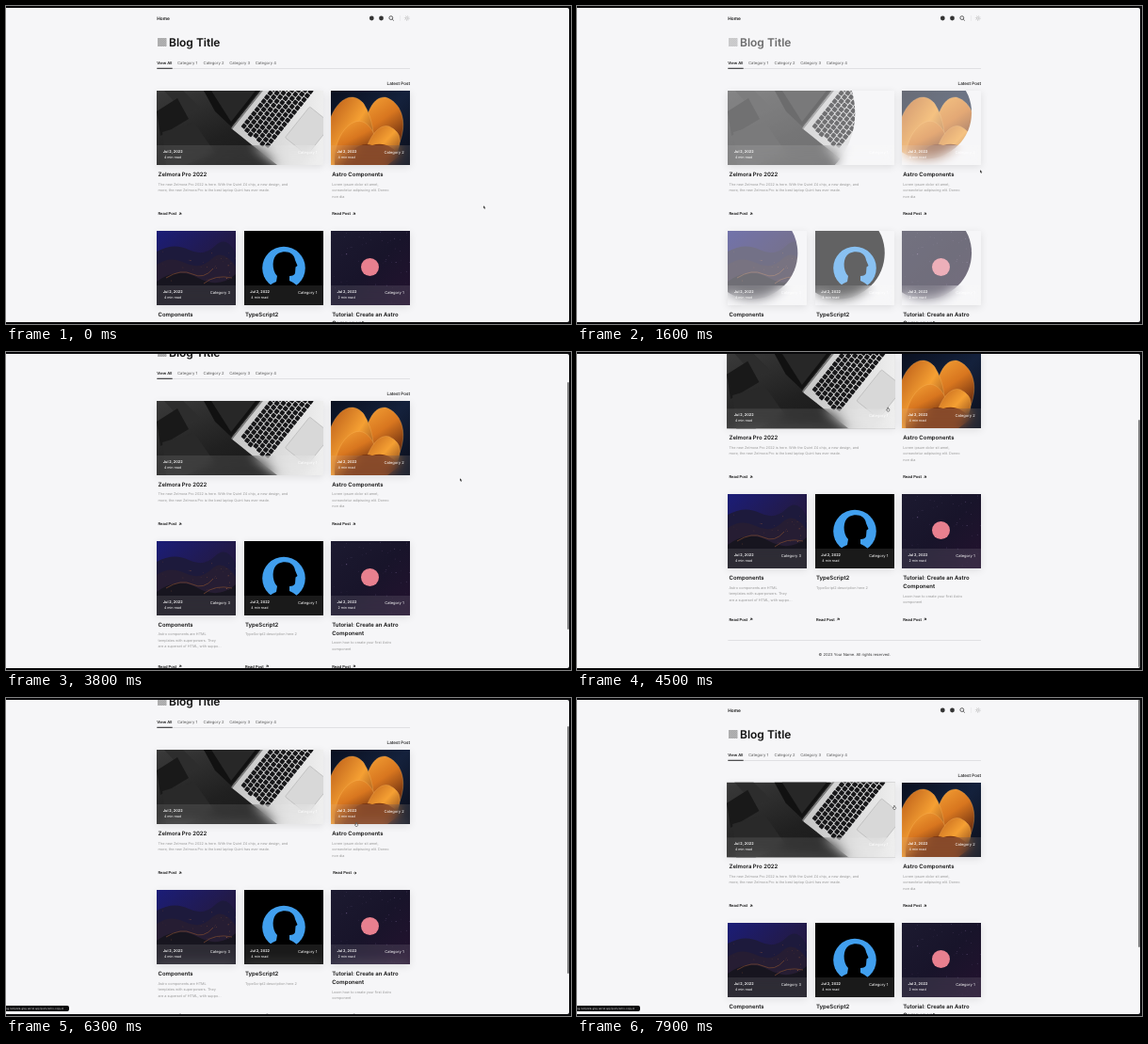
An HTML page for the animation above (8000 ms loop, 600 by 338 pixels).

```html
<!DOCTYPE html>
<html lang="en">
<head>
<meta charset="utf-8">
<title>Blog Title</title>
<style>
html, body { margin: 0; width: 100%; height: 100%; overflow: hidden; background: #000; }
#stage { position: relative; width: 600px; height: 338px; overflow: hidden; background: #08080a; }
#view { position: absolute; left: 0; top: 2px; width: 598px; height: 334px; overflow: hidden; background: #f6f6f8; border-radius: 0 2px 2px 0; }
#page { position: absolute; left: 0; top: -2px; width: 600px; height: 424px; }
svg { position: absolute; left: 0; top: 0; overflow: visible; }
text { font-family: Inter, "Open Sans", sans-serif; text-rendering: geometricPrecision; white-space: pre; }
.card { position: absolute; height: 78.5px; box-shadow: 0 2px 8px rgba(0,0,0,.1); }
.pic { position: absolute; inset: 0; overflow: hidden; }
.bar { position: absolute; left: 0; right: 0; bottom: 0; height: 20.5px; background: rgba(255,255,255,.1); backdrop-filter: blur(6px); }
#thumb { position: absolute; left: 596px; width: 1.6px; height: 263px; border-radius: 1px; background: #777; }
#status { position: absolute; left: 0; top: 327px; width: 67px; height: 6px; border-radius: 0 2px 2px 0; background: #08080a; }
</style>
</head>
<body>
<div id="stage">
  <div id="view"><div id="page"></div></div>
  <div id="thumb"></div>
  <div id="status"></div>
  <svg id="pointer" width="600" height="338">
    <path id="arrow" d="M0 0V3.4L.9 2.7 1.5 4 2.1 3.7 1.5 2.5H2.5Z" fill="#111" stroke="#fff" stroke-width=".3"/>
    <path id="hand" d="M-.4 -1.6Q0 -2.2 .4 -1.6V-.3L1.5 0Q2 1.6 1 2.4H-.6L-1.6 .6 -.4 .5Z" fill="#fff" stroke="#222" stroke-width=".5"/>
  </svg>
</div>
<script>
const $ = id => document.getElementById(id);
const INK = '#111', GREY = '#999';

const text = (x, y, s, size, weight = 400, fill = INK, anchor = 'start') =>
  `<text x="${x}" y="${y}" font-size="${size}" font-weight="${weight}" fill="${fill}" text-anchor="${anchor}">${s}</text>`;
const rect = (x, y, w, h, fill, more = '') =>
  `<rect x="${x}" y="${y}" width="${w}" height="${h}" fill="${fill}" ${more}/>`;
const path = (d, fill, more = '') => `<path d="${d}" fill="${fill}" ${more}/>`;
const gradient = (id, x2, y2, ...colors) =>
  `<linearGradient id="${id}" x1="0" y1="0" x2="${x2}" y2="${y2}">` +
  colors.map((c, i) => `<stop offset="${i / (colors.length - 1)}" stop-color="${c}"/>`).join('') + '</linearGradient>';

let seed = 7;
const random = () => (seed = seed * 16807 % 2147483647) / 2147483647;
const dots = (n, w, y0, h, fill) => Array.from({ length: n }, () =>
  `<circle cx="${random() * w}" cy="${y0 + random() * h}" r="${.2 + random() * .35}" fill="${fill}" opacity="${.3 + random() * .6}"/>`).join('');

function laptop() {
  let keys = '';
  for (let row = 0; row < 7; row++)
    for (let col = 0; col < 17; col++)
      keys += rect(8 + col * 5.6 - row % 3 * 1.2, 7 + row * 5.4, 4.8, 4.6, '#18181a', 'rx=".8"');
  return gradient('desk', 1, 1, '#3a3a3a', '#202020', '#151515') + gradient('metal', 1, 1, '#c4c4c4', '#eee', '#cfcfcf') +
    rect(0, 0, 177, 79, 'url(#desk)') +
    path('M8 0L28 0 46 18 30 24Z', '#2d2d2d') + path('M0 22L22 8 34 30 4 48Z', '#191919') +
    path('M6 44L40 34 62 66 30 79 10 79Z', '#292929') +
    path('M50 0H109L79 38 62 22Z', '#111') + path('M58 0H105L79 33Z', '#272727') +
    `<g transform="translate(79 40) rotate(-51.5)">` +
    rect(0, 0, 160, 120, 'url(#metal)', 'rx="3"') + rect(0, 0, 160, 1.6, '#777') +
    keys + rect(28, 51, 42, 30, '#d8d8d8', 'rx="1.5" stroke="#aaa" stroke-width=".5"') + '</g>';
}

function petals() {
  const line = 'stroke="#ffc066" stroke-opacity=".55" stroke-width=".5"';
  return gradient('night', 1, 1, '#0a1020', '#14213c', '#0b0d18') +
    gradient('petal', .5, 1, '#f6a437', '#d8761f', '#5a230e') + gradient('petal2', 1, 1, '#b85a18', '#f5a033', '#6b2c10') +
    rect(0, 0, 84, 79, 'url(#night)') +
    path('M32 60C36 20 46 6 58 7C74 12 82 32 73 55L52 70Z', 'url(#petal)', line) +
    path('M0 28C8 8 24 0 35 14C45 30 47 50 44 66L20 79H0Z', 'url(#petal2)', line) +
    path('M4 79C2 48 22 26 36 34C48 42 50 56 46 79Z', 'url(#petal)', line) +
    path('M34 79C36 54 50 34 62 38C74 44 76 52 70 66Z', 'url(#petal2)', line) +
    path('M14 79C20 62 32 54 44 58C56 54 68 60 72 70L60 79Z', '#7a3612');
}

function hills() {
  return gradient('dusk', 1, 1, '#1b1d78', '#221a4a', '#2a1530') + rect(0, 0, 84, 79, 'url(#dusk)') +
    path('M0 22Q18 12 34 20T62 16 84 24V79H0Z', '#1d1a3c') +
    path('M0 36Q14 26 30 34T58 30 84 38V79H0Z', '#261d33') +
    path('M0 54Q22 38 44 50T84 46V79H0Z', '#17151f') +
    path('M10 50Q26 40 38 46T60 40M50 56Q62 46 80 50', 'none', 'stroke="#70452f" stroke-width=".8"') +
    dots(32, 84, 22, 32, '#b0663a');
}

function profile() {
  return rect(0, 0, 84, 79, '#000') + '<circle cx="42" cy="39.5" r="22.8" fill="#419fee"/>' +
    path('M22 66Q25 57 34 54L35 48C29 42 29 28 36 24C44 20 53 23 54 31L56.5 37 54.5 38.5 54 45Q53 48 48 48L48 53Q58 57 61 66Z', '#000');
}

function neon() {
  return gradient('space', 1, 1, '#1c1a30', '#18142a', '#24122f') + rect(0, 0, 84, 79, 'url(#space)') +
    dots(70, 84, 0, 79, '#6d5a86') + '<circle cx="41.5" cy="38.5" r="9.5" fill="#e8808f"/>';
}

const cards = [
  { x: 160.3, y: 90, w: 176.5, art: laptop, cat: 1, min: 4, title: ['Zelmora Pro 2022'],
    body: ['The new Zelmora Pro 2022 is here. With the Quint Z4 chip, a new design, and', 'more, the new Zelmora Pro is the best laptop Quint has ever made.'] },
  { x: 345, y: 90, w: 84, art: petals, cat: 2, min: 4, title: ['Astro Components'],
    body: ['Lorem ipsum dolor sit amet,', 'consectetur adipiscing elit. Donec', 'non dia'] },
  { x: 160.3, y: 239, w: 84, art: hills, cat: 3, min: 4, title: ['Components'],
    body: ['Astro components are HTML', 'templates with superpowers. They', 'are a superset of HTML, with suppo...'] },
  { x: 252.7, y: 239, w: 84, art: profile, cat: 1, min: 4, title: ['TypeScript2'],
    body: ['TypeScript2 description here 2'] },
  { x: 345, y: 239, w: 84, art: neon, cat: 1, min: 2, title: ['Tutorial: Create an Astro', 'Component'],
    body: ['Learn how to create your first Astro', 'component'] }
];

function cardText(c, i) {
  const { x, y, w } = c, left = x + 1.2, extra = (c.title.length - 1) * 9;
  return text(x + 6.5, y + 66.4, 'Jul 2, 2022', 3.85, 600, '#fff') +
    text(x + 7.6, y + 72.2, c.min + ' min read', 3.6, 400, '#fff') +
    text(x + w - 6.3, y + 67.2, 'Category ' + c.cat, 4.05, 400, '#fff', 'end') +
    c.title.map((s, n) => text(left, y + 91.2 + n * 8.8, s, 6, 600)).join('') +
    c.body.map((s, n) => text(left, y + 100.5 + extra + n * 6.5, s, 3.78, 400, GREY)).join('') +
    `<g id="read${i}">` + text(left, y + (i < 2 ? 132.4 : 134.6), 'Read Post', 4.1, 600) +
    `<path id="tip${i}" d="M-1.4 0H1.4M.1 -1.3L1.4 0 .1 1.3" fill="none" stroke="${INK}" stroke-width=".7"/></g>`;
}

$('page').innerHTML = cards.map(c =>
  `<div class="card" style="left:${c.x}px;top:${c.y}px;width:${c.w}px"><div class="pic"><svg width="${c.w}" height="79">${c.art()}</svg></div><div class="bar"></div></div>`).join('') +
  '<svg width="600" height="424">' +
  text(160.3, 14.9, 'Home', 4.8, 600) +
  '<circle cx="388.3" cy="13" r="2.4" fill="#333"/><circle cx="398.5" cy="13" r="2.4" fill="#333"/>' +
  '<g fill="none" stroke="#222" stroke-width=".7"><circle cx="408.8" cy="12.6" r="1.9"/><path d="M410.2 14L411.8 15.6"/></g>' +
  rect(418, 10, .5, 6, '#e2e2e4') +
  '<g fill="none" stroke="#aaa" stroke-width=".6"><circle cx="425.8" cy="13" r="1.3"/><circle cx="425.8" cy="13" r="2.5" stroke-dasharray=".7 1.263"/></g>' +
  '<pattern id="hatch" width="1.4" height="1.4" patternUnits="userSpaceOnUse" patternTransform="rotate(-45)"><rect width="1.4" height=".8" fill="#777"/></pattern>' +
  '<g id="title">' + rect(161, 34, 9.5, 9, 'url(#hatch)') + text(173, 42.6, 'Blog Title', 12, 600) + '</g>' +
  text(160.3, 61.6, 'View All', 4.1, 600) +
  [1, 2, 3, 4].map(n => text(182 + (n - 1) * 27.6, 61.6, 'Category ' + n, 4.2, 400, '#555')).join('') +
  rect(160.3, 66, 268.7, .6, '#d2d2d5') + rect(160.3, 65.8, 16.4, .9, INK) +
  text(429, 84.4, 'Latest Post', 4.6, 500, INK, 'end') +
  cards.map(cardText).join('') +
  rect(160.3, 394.2, 268.7, .6, '#d2d2d5') +
  text(294.7, 410.5, '© 2023 Your Name. All rights reserved.', 4.1, 400, '#333', 'middle') + '</svg>';
$('status').innerHTML = '<svg width="67" height="6">' + text(0, 4, 'og-template-gray.vercel.app/posts/astro-copy-6', 2.65, 400, '#eee') + '</svg>';

// Eased value at time t from [time, value] pairs.
function track(t, keys) {
  let i = keys.findIndex(k => k[0] > t);
  if (i < 0) return keys[keys.length - 1][1];
  if (!i) return keys[0][1];
  const [t0, a] = keys[i - 1], [t1, b] = keys[i], u = (t - t0) / (t1 - t0);
  return a + (b - a) * u * u * (3 - 2 * u);
}

const scrollKeys = [[3200, 0], [3800, 38], [4400, 88], [5500, 88], [6300, 35], [6900, 0]];
const xKeys = [[0, 507], [900, 400], [1600, 428], [2600, 485], [2800, 485], [3800, 482], [4300, 325], [5200, 366], [5600, 366], [6300, 372], [7100, 325], [7900, 337]];
const yKeys = [[0, 212], [900, -4], [1600, 174], [2600, 131], [2800, 131], [3800, 134], [4300, 50], [5200, 134], [6300, 134], [7100, 112], [7900, 116]];
const zoomKeys = [[4150, 0], [4300, 1], [4500, 1], [4650, 0], [6850, 0], [7050, 1]];
const linkKeys = [[5000, 0], [5200, 1], [6350, 1], [6550, 0]];
const thumbKeys = [[3150, 0], [3300, .9], [4800, .9], [5200, 0], [5550, 0], [5700, .9]];

const pics = [...document.querySelectorAll('.pic')];
const firstCard = document.querySelector('.card');

function draw(t) {
  const scroll = track(t, scrollKeys), link = track(t, linkKeys);
  const p = t < 1000 ? 1 : Math.min(1, (t - 1000) / 1000);
  $('page').style.transform = `translateY(${-scroll}px)`;
  $('title').setAttribute('opacity', p);
  for (const pic of pics) {
    pic.style.opacity = p;
    pic.style.clipPath = p < 1 ? `circle(${p * 100}% at 30% 30%)` : 'none';
  }
  firstCard.style.transform = `scale(${1 + .011 * track(t, zoomKeys)})`;
  cards.forEach((c, i) => {
    const h = i === 1 ? link : 0;
    $('read' + i).setAttribute('transform', `translate(${h} 0)`);
    $('tip' + i).setAttribute('transform', `translate(${c.x + 24.6} ${c.y + (i < 2 ? 131 : 133.2)}) rotate(${-45 * (1 - h)})`);
  });
  $('thumb').style.top = 2 + scroll * .79 + 'px';
  $('thumb').style.opacity = track(t, thumbKeys);
  $('status').style.opacity = t >= 5900 ? 1 : 0;
  const hand = t > 4150 && t < 4650 || t > 5000;
  $('pointer').style.transform = `translate(${track(t, xKeys)}px, ${track(t, yKeys)}px)`;
  $('hand').style.display = hand ? '' : 'none';
  $('arrow').style.display = hand ? 'none' : '';
}

const start = performance.now();
function tick() {
  draw((performance.now() - start) % 8000);
  requestAnimationFrame(tick);
}
tick();
</script>
</body>
</html>
```
